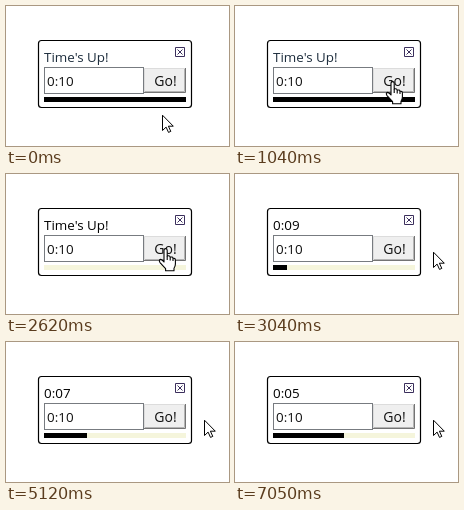
Recreate the animation shown at these times as an HTML page. Size 223 by 140 pixels, loop 8 s.

```html
<!DOCTYPE html>
<html lang="en">
<head>
<meta charset="utf-8">
<title>Countdown timer</title>
<style>
html, body { margin: 0; width: 100%; height: 100%; overflow: hidden; background: #fff; }
svg { display: block; width: 100vw; height: 100vh; }
text { font: 13.4px "Open Sans", "Noto Sans", sans-serif; fill: #111; }
</style>
</head>
<body>
<svg viewBox="0 0 223 140">
  <rect x="32.5" y="34.5" width="153" height="67" rx="3" fill="#fff" stroke="#000" stroke-width="1.2"/>
  <text id="label" x="38" y="56"></text>
  <path d="M169.5 41.5h9v9h-9zM171.5 43.5l5 5M176.5 43.5l-5 5" fill="none" stroke="#3b2f5c"/>

  <rect x="38.5" y="61.5" width="99" height="26" fill="#fff" stroke="#777b80"/>
  <text x="41" y="80">0:10</text>

  <rect x="138" y="62" width="42" height="25" fill="#efefef"/>
  <path d="M138.5 86V62.5H179" fill="none" stroke="#dcdcdc"/>
  <path d="M139 85.5H178.5V63" fill="none" stroke="#b4b4b4"/>
  <path d="M138 86.5H179.5V62" fill="none" stroke="#747474"/>
  <text x="159.5" y="80" text-anchor="middle" style="font-size:14px">Go!</text>

  <rect x="38" y="91" width="142" height="5" fill="#f5f5dc"/>
  <rect id="bar" x="38" y="91" height="5"/>

  <g id="arrow" fill="#fff" stroke="#000" stroke-width="1">
    <path d="M.5 1.2V16.5L4.1 13.1L6.5 18.4L8.8 17.4L6.4 12.2H11.3Z"/>
  </g>
  <g id="hand" fill="#fff" stroke="#000" stroke-width="1.1" stroke-linejoin="round">
    <path d="M6 14V2.5Q6 .6 7.6 .6T9.2 2.5V8Q12 7.2 12.2 9.2Q14.8 8.4 15 10.4Q17.3 9.8 17.4 12.2V16Q17.4 18.2 16 20.2V22.8H7.6V20.6L2 14.6Q.4 11.6 2.6 11.4Q4.2 11.5 6 14Z"/>
    <path d="M9.2 8V12M12.2 9.2V12.4M15 10.4V13" fill="none"/>
  </g>
</svg>
<script>
const LOOP = 8000, START = 2140;
const el = id => document.getElementById(id);
const label = el("label"), bar = el("bar");
const cursors = { arrow: el("arrow"), hand: el("hand") };

// time, cursor shape, x, y
const moves = [
  [0, "arrow", 156, 108],
  [150, "hand", 148, 85],
  [300, "hand", 148, 81],
  [760, "hand", 148, 78],
  [890, "hand", 149, 76],
  [1040, "hand", 150, 75],
  [2620, "hand", 152, 74],
  [2740, "hand", 168, 78],
  [2890, "arrow", 198, 77]
];
const ticks = [3040, 4150, 5120, 6170, 7050];

function render(t) {
  const [, shape, x, y] = moves.filter(m => m[0] <= t).pop();
  for (const name in cursors) {
    cursors[name].setAttribute("visibility", name === shape ? "visible" : "hidden");
  }
  cursors[shape].setAttribute("transform", `translate(${x} ${y})`);

  const elapsed = ticks.filter(k => k <= t).length;
  label.textContent = elapsed ? `0:0${10 - elapsed}` : "Time's Up!";
  label.style.fill = t < START ? "#1c2c3c" : "#000";
  bar.setAttribute("width", t < START ? 142 : Math.round(elapsed * 14.2));
}

const begin = performance.now();
function loop() {
  render((performance.now() - begin) % LOOP);
  requestAnimationFrame(loop);
}
loop();
</script>
</body>
</html>
```
